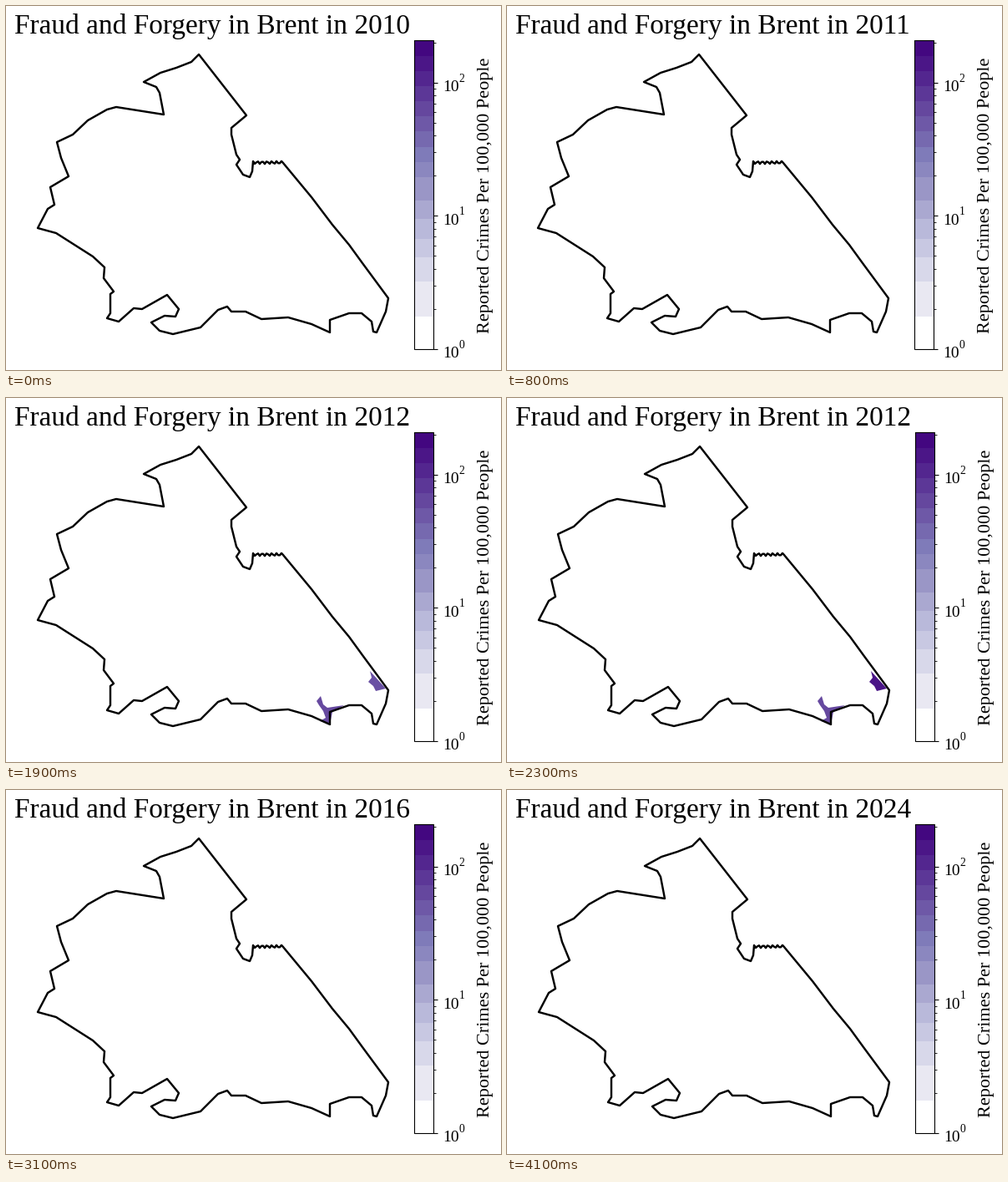
A matplotlib script that plays this animation: 593x436 px, repeating every 4200 ms.

```python
import numpy as np
import matplotlib as mpl
import matplotlib.pyplot as plt
from matplotlib.animation import FuncAnimation
from matplotlib.patches import Polygon, Rectangle

W, H, DPI, FRAMES = 593, 436, 100, 42
mpl.rcParams["font.family"] = "Liberation Serif"
PURPLES = mpl.colormaps["Purples"]

# Key points of the borough boundary, clockwise from the northern tip
NORTH_EAST = [(231, 58), (288, 131), (270, 146), (270, 154), (276, 178),
              (280, 184), (276, 190), (284, 202), (292, 205), (295, 198)]
FRINGE = [(x, 187.5 + 1.7 * np.sin(1.1 * x)) for x in range(296, 332, 2)]
SOUTH_EAST = [(332, 188), (366, 229), (391, 262), (411, 286), (427, 308),
              (458, 350), (455, 366), (444, 391), (440, 390), (438, 378),
              (426, 368), (411, 368), (388, 376), (388, 391), (366, 381),
              (338, 373), (306, 375), (287, 366), (270, 366), (265, 360)]
SOUTH_WEST = [(254, 364), (233, 385), (200, 393), (184, 389), (174, 379),
              (190, 371), (203, 372), (207, 363), (193, 346), (163, 363),
              (153, 362), (135, 378), (121, 374), (125, 368), (125, 345),
              (129, 342), (117, 326), (118, 313), (104, 300), (60, 272)]
NORTH_WEST = [(38, 266), (50, 243), (58, 238), (53, 217), (75, 204),
              (66, 182), (61, 163), (80, 154), (98, 137), (121, 124),
              (132, 121), (189, 130), (184, 104), (180, 97), (165, 91),
              (185, 80), (204, 74), (222, 67)]

# The two small areas with reported crimes
LEFT = [(372, 363), (377, 357), (380, 367), (385, 371), (405, 368), (391, 376),
        (388, 391), (376, 387), (383, 383), (380, 375), (375, 368)]
RIGHT = [(436, 327), (455, 348), (443, 351), (440, 345), (434, 340), (438, 335)]

BAR_X0, BAR_X1, BAR_TOP, BAR_BASE = 489.2, 512.2, 41.4, 410.9
DECADE = 159.5
BANDS = [BAR_BASE, 372, 330, 301, 279, 255, 233, *np.linspace(205, BAR_TOP, 10)]

fig = plt.figure(figsize=(W / DPI, H / DPI), dpi=DPI, facecolor="white")
ax = fig.add_axes([0, 0, 1, 1])
ax.set_ylim(H, 0)
ax.axis("off")


def shape(points, **style):
    return ax.add_patch(Polygon(points, closed=True, **style))


def bar_box(top, base, **style):
    ax.add_patch(Rectangle((BAR_X0, top), BAR_X1 - BAR_X0, base - top, **style))


def log_y(value):
    return BAR_BASE - DECADE * np.log10(value)


def tick(value, length, width):
    y = log_y(value)
    ax.plot([BAR_X1, BAR_X1 + length], [y, y], color="black", lw=width,
            solid_capstyle="butt")


def draw_colorbar():
    for base, top in zip(BANDS, BANDS[1:]):
        shade = (BAR_BASE - (base + top) / 2) / (BAR_BASE - BAR_TOP)
        color = "white" if base == BAR_BASE else PURPLES(shade)
        bar_box(top, base, fc=color, ec="none", antialiased=False)
    bar_box(BAR_TOP, BAR_BASE, fc="none", ec="black", lw=0.8)
    for power in range(3):
        y = log_y(10 ** power)
        tick(10 ** power, 5.2, 0.8)
        ax.text(523, y + 10.3, "10", size=14, va="baseline")
        ax.text(542.5, y - 1.3, str(power), size=9.8, va="baseline")
        for digit in range(2, 10):
            if digit * 10 ** power <= 200:
                tick(digit * 10 ** power, 3.1, 0.6)
    ax.text(584, 226.5, "Reported Crimes Per 100,000 People", size=16,
            rotation=90, ha="right", va="center")


def year_at(frame):
    """Monthly steps up to 2012, then one step a year until 2024."""
    if frame < 28:
        return 2010 + (frame >= 7) + (frame >= 19)
    return min(2013 + frame - 28, 2024)


def shades_at(frame):
    """Colour scale positions of both areas, or None in an empty month."""
    phase = frame % 8
    if phase == 0 or frame >= 28:
        return None
    return 0.77 if frame % 2 else 0.83, 0.93 if phase == 7 else 0.75


areas = [shape(points, ec="none", zorder=1) for points in (LEFT, RIGHT)]
shape(NORTH_EAST + FRINGE + SOUTH_EAST + SOUTH_WEST + NORTH_WEST,
      fc="none", ec="black", lw=1.75, joinstyle="round", zorder=2)
draw_colorbar()
title = fig.text(10 / W, 1 - 33 / H, "", size=24, va="baseline")


def update(frame):
    year = year_at(frame)
    title.set_text(f"Fraud and Forgery in Brent in {year}")
    # The kerned "11" narrows the title and pulls the layout left
    shift = int(year == 2011)
    ax.set_xlim(shift, W + shift)
    shades = shades_at(frame)
    for i, area in enumerate(areas):
        area.set_visible(shades is not None)
        if shades:
            area.set_facecolor(PURPLES(shades[i]))
    return [title, *areas]


anim = FuncAnimation(fig, update, frames=FRAMES, interval=100, repeat=True,
                     repeat_delay=0, blit=False)
plt.show()
```
